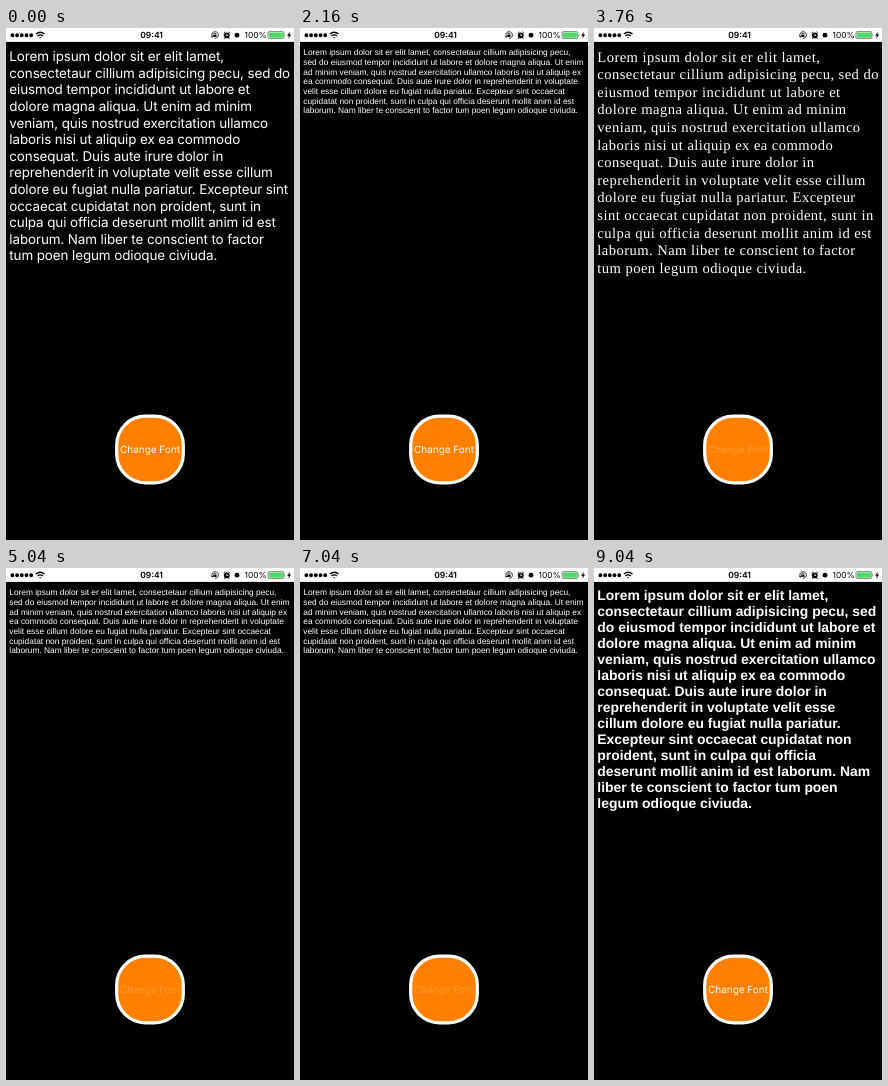
An HTML page for the animation above (9200 ms loop, 288 by 512 pixels).

```html
<!DOCTYPE html>
<html lang="la">
<head>
<meta charset="utf-8">
<title>Change Font</title>
<style>
html, body { margin: 0; width: 100%; height: 100%; overflow: hidden; background: #000; }
svg { position: absolute; left: 0; top: 0; }
text { font-family: Inter, sans-serif; text-anchor: middle; text-rendering: geometricPrecision; }
#copy { text-anchor: start; fill: #fff; }
</style>
</head>
<body>
<svg width="288" height="512" viewBox="0 0 288 512">
  <rect width="288" height="13.9" fill="#fff"/>
  <path d="M6.4 7.2h21" stroke="#000" stroke-width="3.9" stroke-linecap="round" stroke-dasharray="0 4.7"/>
  <g fill="none" stroke="#000" stroke-width="1.3">
    <path d="M29.9 6.1q4.3-3.8 8.6 0M31.5 8q2.7-2.3 5.4 0"/>
    <path d="M33 9.2h2.4l-1.2 1.4z" fill="#000" stroke="none"/>
    <g stroke-width=".8">
      <path d="M206.5 9a3.3 3.3 0 1 1 2.4 1.3M205.3 8.2l1.2 1.2 1.1-1.5"/>
      <path d="M207.9 6.9v-.7a1 1 0 0 1 2 0v.7"/>
      <path d="M207.3 6.8h3.2v2.1h-3.2z" fill="#000" stroke="none"/>
      <circle cx="220.8" cy="7.4" r="2.9" fill="#000" stroke="none"/>
      <path d="M217.6 5.2l1.6-1.5M224 5.2l-1.6-1.5M219 9.7l-.9 1.2M222.6 9.7l.9 1.2"/>
      <path d="M220.8 5.7v1.8h1.4" stroke="#fff"/>
    </g>
  </g>
  <circle cx="231" cy="7.2" r="2.4"/>
  <text x="145.5" y="10.2" font-size="8.5" font-weight="600">09:41</text>
  <text x="249.6" y="10.2" font-size="8.4">100%</text>
  <rect x="262" y="3.6" width="15.8" height="7" rx="1.3" fill="#fff" stroke="#333" stroke-width=".6"/>
  <rect x="262.8" y="4.4" width="14.2" height="5.4" rx=".7" fill="#4cd964"/>
  <path d="M278.6 5.8q1.2 1.3 0 2.6z" fill="#333"/>
  <path d="M283.8 3.4l-2.6 4.3h1.7l-.7 3.2 2.9-4.4h-1.8z"/>
  <rect x="110.7" y="388.2" width="66.6" height="66.6" rx="28.8" fill="#ff8000" stroke="#fff" stroke-width="3.2"/>
  <text id="label" x="144" y="425.1" font-size="9.95" fill="#fff">Change Font</text>
  <text id="copy"></text>
</svg>
<script>
const words = `Lorem ipsum dolor sit er elit lamet, consectetaur cillium adipisicing pecu, sed do
eiusmod tempor incididunt ut labore et dolore magna aliqua. Ut enim ad minim veniam, quis nostrud
exercitation ullamco laboris nisi ut aliquip ex ea commodo consequat. Duis aute irure dolor in
reprehenderit in voluptate velit esse cillum dolore eu fugiat nulla pariatur. Excepteur sint
occaecat cupidatat non proident, sunt in culpa qui officia deserunt mollit anim id est laborum.
Nam liber te conscient to factor tum poen legum odioque civiuda.`.split(/\s+/);

// font, letter spacing, first baseline, line pitch, words on each line
const fonts = {
  plain: ['400 13.45px Inter, sans-serif', -.11, 33.1, 16.6, [7, 6, 6, 7, 5, 7, 6, 6, 7, 6, 8, 7, 5]],
  small: ['400 8.35px "Liberation Sans", sans-serif', 0, 27.4, 9.65, [11, 13, 12, 11, 11, 13, 12]],
  didone: ['400 14.6px "Liberation Serif", serif', .44, 33.5, 17.6, [7, 6, 6, 7, 5, 7, 6, 6, 6, 7, 8, 7, 5]],
  times: ['400 13.92px "Liberation Serif", serif', 0, 32.3, 16, [8, 7, 8, 7, 8, 7, 8, 6, 8, 9, 7]],
  bold: ['700 13.92px "Liberation Sans", sans-serif', 0, 32.3, 16, [7, 5, 7, 7, 5, 7, 6, 5, 6, 5, 6, 7, 7, 3]]
};

// each press: time in ms, font shown once it is released
const presses = [[1200, 'small'], [2560, 'didone'], [3680, 'small'],
                 [5040, 'times'], [6000, 'small'], [6880, 'bold']];
const LOOP = 9200, STEP = 80, HOLD = 400, FADE = 280, DIM = .2;

const copy = document.getElementById('copy');
const label = document.getElementById('label');
let shown;

function setFont(name) {
  if (name === shown) return;
  shown = name;
  const [font, spacing, base, pitch, counts] = fonts[name];
  let at = 0;
  copy.style.font = font;
  copy.style.letterSpacing = spacing + 'px';
  copy.innerHTML = counts.map((n, i) =>
    `<tspan x="3.3" y="${base + i * pitch}">${words.slice(at, at += n).join(' ')}</tspan>`).join('');
}

function draw(now) {
  const t = Math.floor(now % LOOP / STEP) * STEP;
  const released = presses.filter(p => p[0] + HOLD <= t).pop();
  const pressed = presses.filter(p => p[0] <= t).pop();
  const since = pressed ? t - pressed[0] - HOLD : FADE;
  const fade = Math.min(1, Math.max(0, since / FADE));
  setFont(released ? released[1] : 'plain');
  label.setAttribute('opacity', DIM + (1 - DIM) * fade);
}

const begin = performance.now();
function tick() {
  draw(performance.now() - begin);
  requestAnimationFrame(tick);
}
tick();
</script>
</body>
</html>
```
